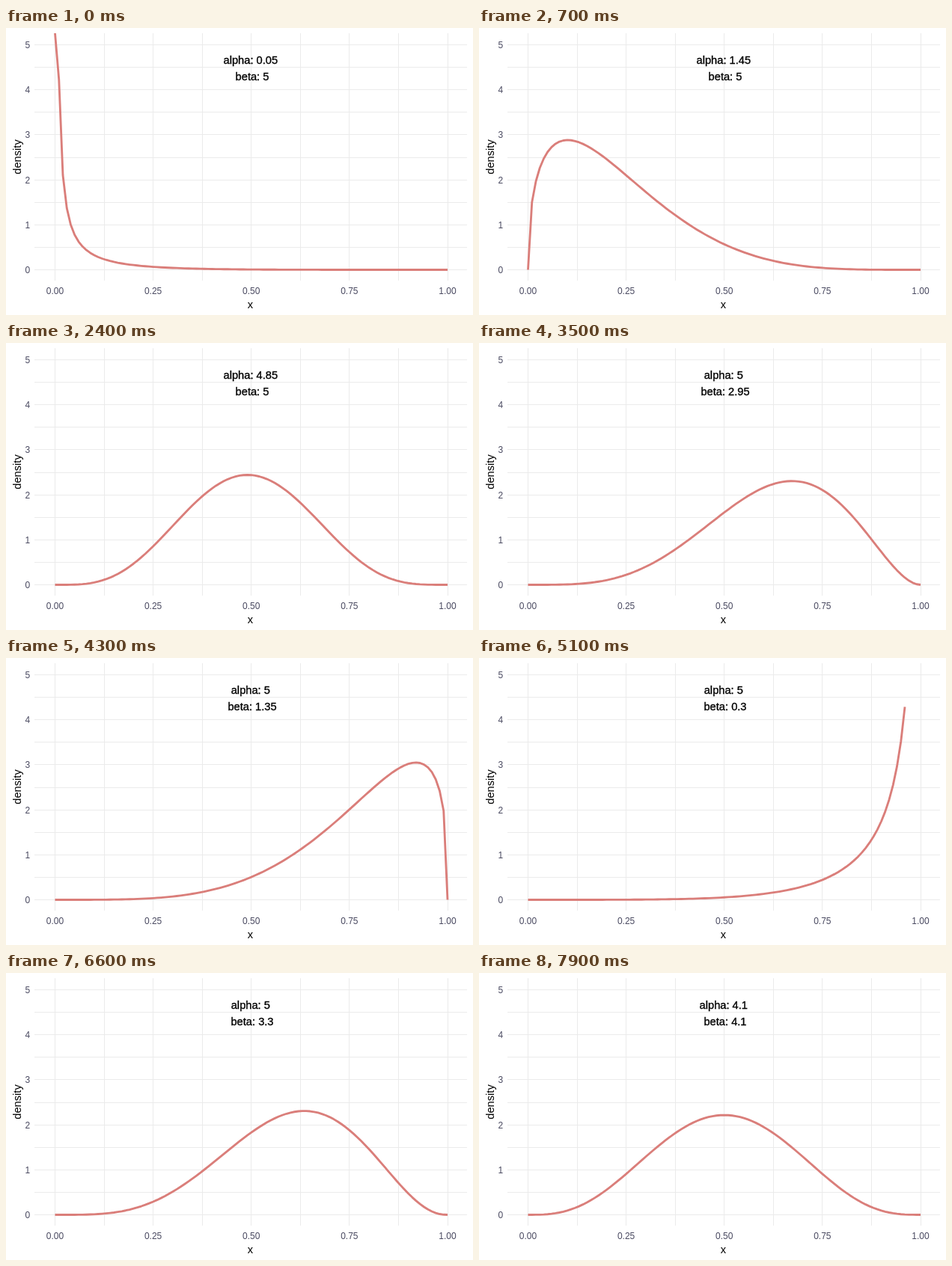
Write an HTML page that moves like this. It is 624x384 px and loops after 8 s.

```html
<!DOCTYPE html>
<html lang="en">
<head>
<meta charset="utf-8">
<title>Beta density</title>
<style>
  html, body { margin: 0; width: 100%; height: 100%; overflow: hidden; background: #fff; }
  svg { display: block; font: 14.67px Arial, "Liberation Sans", sans-serif; text-anchor: middle; }
  #grid { stroke: #ebebeb; shape-rendering: crispEdges; }
  #ticks { font-size: 12px; fill: #494960; }
  #ticks .y { text-anchor: end; }
  #curve { fill: none; stroke: #da7e7a; stroke-width: 2.85; stroke-linejoin: round; }
  .param { stroke: #000; stroke-width: .35; }
</style>
</head>
<body>
<svg width="624" height="384" viewBox="0 0 624 384">
  <path id="grid"/>
  <g id="ticks"></g>
  <text x="326.5" y="375">x</text>
  <text transform="translate(20 172.5) rotate(-90)">density</text>
  <path id="curve"/>
  <text id="alpha" class="param" x="326.8" y="48"></text>
  <text id="beta" class="param" x="329" y="70"></text>
</svg>
<script>
const $ = id => document.getElementById(id);
const TOP = 7, BOTTOM = 338, LEFT = 38, RIGHT = 616, Y_MAX = 5;
const px = x => 65.5 + 524.5 * x;
const py = y => 323.5 - 60.2 * y;
const crisp = v => Math.floor(v) + 0.5;

function drawAxes() {
  let grid = '', ticks = '';
  for (let i = 0; i <= 8; i++) {
    grid += `M${crisp(px(i / 8))} ${TOP}V${BOTTOM}`;
    if (i % 2 === 0) ticks += `<text x="${px(i / 8)}" y="356">${(i / 8).toFixed(2)}</text>`;
  }
  for (let i = 0; i <= 10; i++) {
    grid += `M${LEFT} ${crisp(py(i / 2))}H${RIGHT}`;
    if (i % 2 === 0) ticks += `<text class="y" x="32.3" y="${py(i / 2) + 4.5}">${i / 2}</text>`;
  }
  $('grid').setAttribute('d', grid);
  $('ticks').innerHTML = ticks;
}

// Stirling series, shifted upwards for accuracy
function logGamma(z) {
  let shift = 0;
  while (z < 8) shift += Math.log(z++);
  return (z - 0.5) * Math.log(z) - z + Math.log(2 * Math.PI) / 2
    + 1 / (12 * z) - 1 / (360 * z ** 3) - shift;
}

// Both parameters in twentieths
function paramsAt(n) {
  if (n < 100) return [n + 1, 100];
  if (n < 199) return [100, 199 - n];
  if (n < 299) return [100, n - 198];
  return [398 - n, 398 - n];
}

// Finite values above the scale leave a gap; infinite ones sit on the panel edge
function curvePath(a, b) {
  const scale = Math.exp(logGamma(a + b) - logGamma(a) - logGamma(b));
  let path = '', pen = 'M';
  for (let i = 0; i <= 100; i++) {
    const x = i / 100;
    const d = scale * x ** (a - 1) * (1 - x) ** (b - 1);
    if (d > Y_MAX && d < Infinity) {
      pen = 'M';
      continue;
    }
    path += `${pen}${px(x).toFixed(2)} ${(d === Infinity ? TOP : py(d)).toFixed(2)}`;
    pen = 'L';
  }
  return path;
}

let shown = -1;
function render(now) {
  const step = Math.floor(now % 8000 / 100);
  if (step !== shown) {
    shown = step;
    const [a, b] = paramsAt(step * 4).map(v => v / 20);
    $('curve').setAttribute('d', curvePath(a, b));
    $('alpha').textContent = `alpha: ${a}`;
    $('beta').textContent = `beta: ${b}`;
  }
  requestAnimationFrame(render);
}

drawAxes();
render(performance.now());
</script>
</body>
</html>
```
